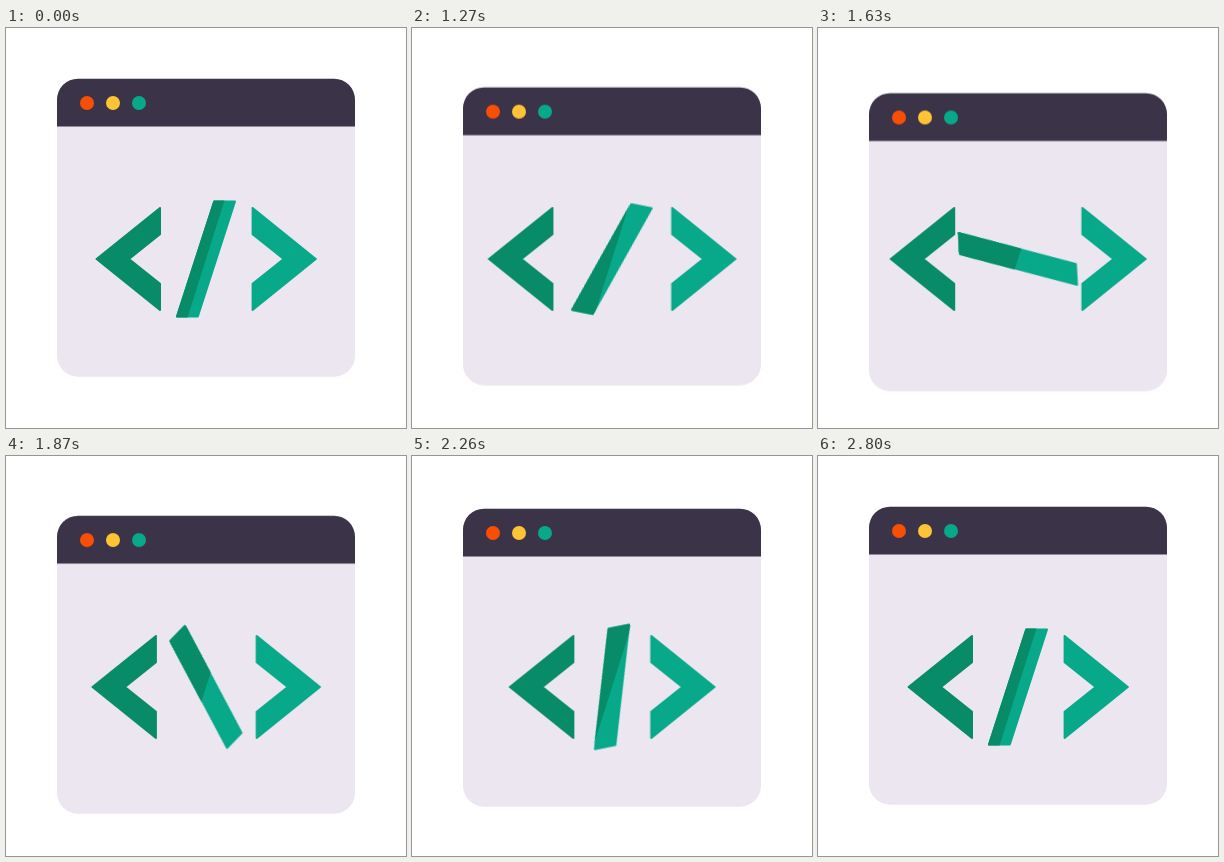
Recreate the animation shown at these times as an HTML page. Size 400 by 400 pixels, loop 2.83 s.

```html
<!DOCTYPE html>
<html lang="en">
<head>
<meta charset="utf-8">
<title>Code window</title>
<style>
  html, body {
    margin: 0;
    width: 100%;
    height: 100%;
    overflow: hidden;
    background: #fff;
  }
  svg {
    display: block;
    width: 100%;
    height: 100%;
  }
  .teal { fill: #08a88a; stroke: #08a88a; }
  .dark { fill: #078b68; stroke: #078b68; }
  .glyph {
    stroke-width: 2;
    stroke-linejoin: round;
  }

  .window, .spin, .left, .right {
    animation: 2830ms linear infinite;
  }
  .window { animation-name: bob; }
  .left, .right { animation-name: spread; }
  .left { --dir: -1; }
  .right { --dir: 1; }
  .spin {
    animation-name: spin;
    transform-origin: 200px 231px;
  }

  /* Rest until 1000 ms, settle again at 2800 ms */
  @keyframes bob {
    0% { transform: translateY(0); }
    35.336% {
      transform: translateY(0);
      animation-timing-function: cubic-bezier(.4, 0, .48, 1);
    }
    54.417% {
      transform: translateY(14.8px);
      animation-timing-function: cubic-bezier(.3, 0, .19, 1);
    }
    98.94%, 100% { transform: translateY(0); }
  }
  @keyframes spread {
    0% { transform: translateX(0); }
    35.336% {
      transform: translateX(0);
      animation-timing-function: cubic-bezier(.33, 0, .31, 1);
    }
    54.417% {
      transform: translateX(calc(var(--dir) * 18.5px));
      animation-timing-function: cubic-bezier(.4, 0, .2, 1);
    }
    86.219% {
      transform: translateX(calc(var(--dir) * -8px));
      animation-timing-function: cubic-bezier(.4, 0, .2, 1);
    }
    98.94%, 100% { transform: translateX(0); }
  }
  @keyframes spin {
    0% { transform: rotate(0deg); }
    35.336% {
      transform: rotate(0deg);
      animation-timing-function: cubic-bezier(.41, 0, .21, 1);
    }
    98.94%, 100% { transform: rotate(180deg); }
  }
</style>
</head>
<body>
<svg viewBox="0 0 400 400">
  <defs>
    <!-- The shade boundary stays put while the slash turns -->
    <clipPath id="shade">
      <path d="M100 131H231.5L168.5 331H100Z"/>
    </clipPath>
    <path id="slash" d="M208.2 173.5H229L191.8 288.5H171Z"/>
  </defs>

  <g class="window">
    <rect x="51" y="50.7" width="298" height="298" rx="21" fill="#ebe6ef"/>
    <path d="M51 98.4V71.7a21 21 0 0 1 21-21H328a21 21 0 0 1 21 21V98.4Z" fill="#3b3347"/>
    <circle cx="81" cy="75" r="7" fill="#f94f04"/>
    <circle cx="107" cy="75" r="7" fill="#ffc436"/>
    <circle cx="133" cy="75" r="7" fill="#08a88a"/>
  </g>

  <path class="glyph dark left" d="M90.6 231L154 180V206.3L123 231L154 255.7V282Z"/>
  <path class="glyph teal right" d="M309.8 231L246.6 180V206.3L277.6 231L246.6 255.7V282Z"/>

  <g class="glyph teal spin"><use href="#slash"/></g>
  <g clip-path="url(#shade)">
    <g class="glyph dark spin"><use href="#slash"/></g>
  </g>
</svg>
</body>
</html>
```
